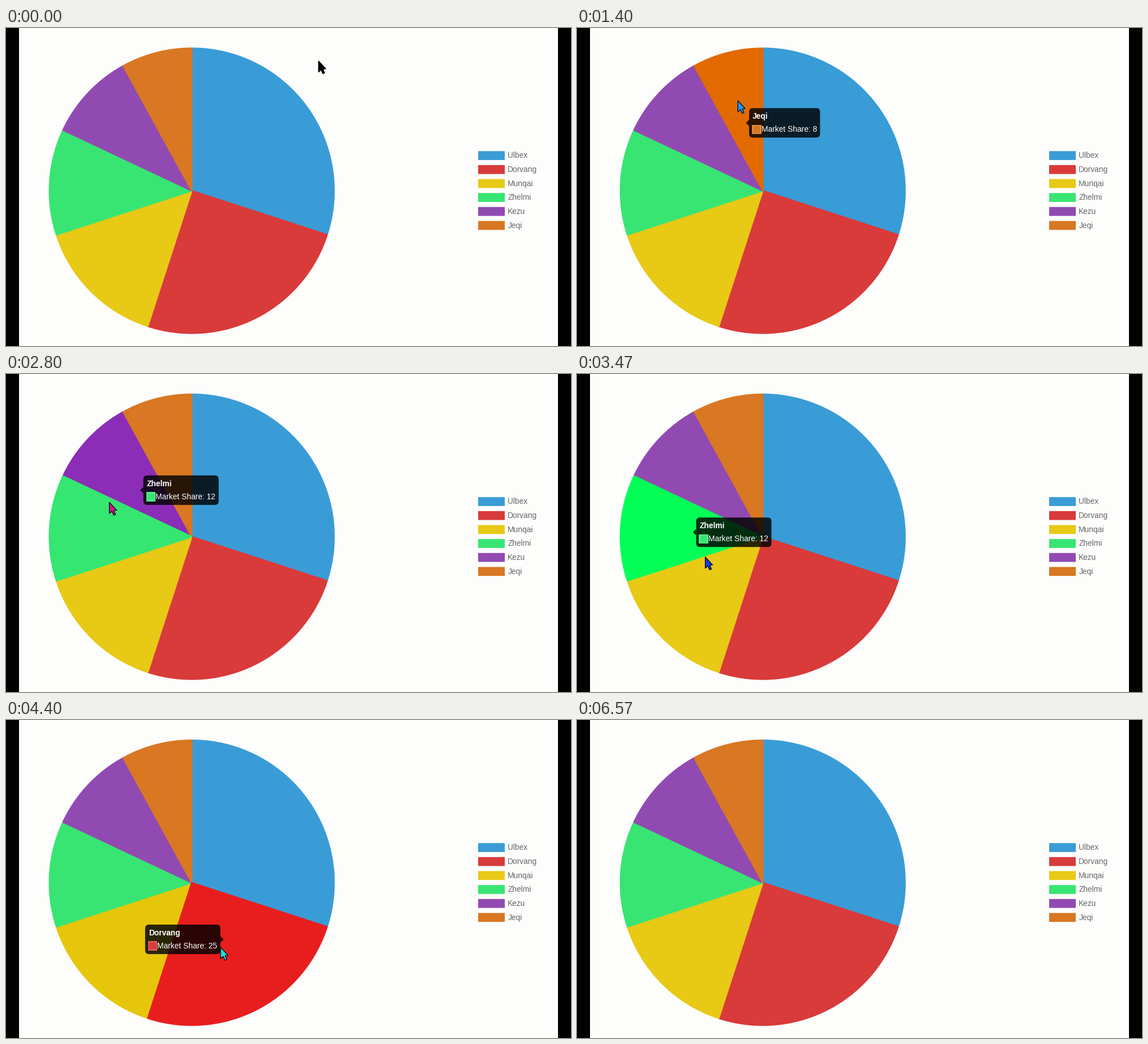
A matplotlib script for the animation above (6.6 s loop, 998 by 561 pixels).

```python
import colorsys
import numpy as np
import matplotlib.pyplot as plt
from matplotlib.animation import FuncAnimation
from matplotlib.colors import to_rgb
from matplotlib.patches import FancyBboxPatch, Polygon, Rectangle

W, H, DPI = 998, 561, 64
PT = 72 / DPI  # points per pixel
STEP, LOOP = 25, 6600
CX, CY, R = 328.1, 287.1, 251.3
FADE, MOVE, LAG = 200, 400, 60  # ms

NAMES = ["Ulbex", "Dorvang", "Munqai", "Zhelmi", "Kezu", "Jeqi"]
SHARE = [30, 25, 15, 12, 10, 8]
BASE = [np.array(to_rgb(c)) for c in
        ("#3a9cd6", "#d93a3a", "#e8c916", "#38e572", "#914ab2", "#d97722")]
EDGES = np.concatenate([[0], np.cumsum(SHARE)]) / 100 * 2 * np.pi

# pointer stops: time, x, y
STOPS = np.array([
    (0, 552, 58), (1120, 328, 112), (1400, 284, 128), (1910, 253, 150),
    (2230, 225, 171), (2740, 182, 219), (3470, 228, 325), (4280, 293, 396),
    (4400, 379, 401), (5130, 445, 325), (5230, 505, 150)], float)
EXIT = STOPS[-1, 0]


def vivid(color):
    """Hover colour: half again the saturation, a tenth darker."""
    h, l, s = colorsys.rgb_to_hls(*color)
    return np.array(colorsys.hls_to_rgb(h, 0.9 * l, min(1, 1.5 * s)))


HOVER = [vivid(c) for c in BASE]


def ease(p):
    return 1 - (1 - np.clip(p, 0, 1)) ** 4


def on_circle(a, r):
    return CX + r * np.sin(a), CY - r * np.cos(a)


def pointer(t):
    """Monotone cubic through the stops."""
    times, pos = STOPS[:, 0], STOPS[:, 1:]
    span = np.diff(times)
    d = np.diff(pos, axis=0) / span[:, None]
    a, b = d[:-1], d[1:]
    slope = np.zeros_like(pos)
    same = a * b > 0
    slope[1:-1][same] = (2 * a * b)[same] / (a + b)[same]
    i = min(np.searchsorted(times, t, side="right") - 1, len(d) - 1)
    h = span[i]
    s = (t - times[i]) / h
    return ((1 + 2 * s) * (1 - s) ** 2 * pos[i]
            + s * (1 - s) ** 2 * h * slope[i]
            + s * s * (3 - 2 * s) * pos[i + 1]
            + s * s * (s - 1) * h * slope[i + 1])


def slice_at(x, y):
    if np.hypot(x - CX, y - CY) > R + 1:
        return None
    a = np.arctan2(x - CX, CY - y) % (2 * np.pi)
    return int(np.searchsorted(EDGES, a, side="right") - 1) % 6


def find_hovers():
    """(time, slice) each time the pointer enters another slice or leaves."""
    hovers, last = [], None
    for t in np.arange(0, EXIT, 5):
        k = slice_at(*pointer(t))
        if k != last:
            hovers.append((t + LAG, k))
            last = k
    return hovers + [(EXIT + LAG, None)]


HOVERS = find_hovers()


def glow_at(t):
    """Hover strength of every slice and the slice now hovered."""
    glow, active = np.zeros(6), None
    ends = [s for s, _ in HOVERS[1:]] + [LOOP]
    for (start, k), end in zip(HOVERS, ends):
        if t < start:
            break
        active = k
        goal = np.arange(6) == k
        glow = glow + (goal - glow) * ease((min(t, end) - start) / MOVE)
    return glow, active


def tip_goal(k):
    """Left edge, middle height and width of the tooltip for slice k."""
    x, y = on_circle((EDGES[k] + EDGES[k + 1]) / 2, R / 2)
    w = 133 if SHARE[k] > 9 else 125
    return np.array([x + 7.8 if x < CX else x - 7.8 - w, y, w])


def tip_at(t):
    """Slice named in the tooltip, its box and its opacity."""
    enters, leave = HOVERS[:-1], HOVERS[-1][0]
    shown = box = None
    ends = [s for s, _ in enters[1:]] + [LOOP]
    for (start, k), end in zip(enters, ends):
        if t < start:
            break
        shown, goal = k, tip_goal(k)
        if box is None:
            box = goal
        box = box + (goal - box) * ease((min(t, end) - start) / MOVE)
    alpha = min((t - enters[0][0]) / FADE, 1 - (t - leave) / FADE)
    return shown, box, np.clip(alpha, 0, 1)


fig = plt.figure(figsize=(W / DPI, H / DPI), dpi=DPI, facecolor="#fdfdfc")
ax = fig.add_axes([0, 0, 1, 1])
ax.set_xlim(0, W)
ax.set_ylim(H, 0)
ax.axis("off")


def add(patch):
    return ax.add_patch(patch)


def label(x, y, text, color, z=1, **kw):
    return ax.text(x, y, text, color=color, family="Liberation Sans",
                   fontsize=13.7 * PT, va="baseline", zorder=z, **kw)


for x in (0, 975):
    add(Rectangle((x, 0), 23, H, fc="black", lw=0))

wedges = []
for k in range(6):
    x, y = on_circle(np.linspace(EDGES[k], EDGES[k + 1], 120), R)
    pts = np.column_stack([np.append(x, CX), np.append(y, CY)])
    wedges.append(add(Polygon(pts, lw=2.6 * PT, joinstyle="bevel")))
    top = 217.2 + 24.65 * k
    add(Rectangle((834, top), 47, 15.7, fc=BASE[k], lw=0, snap=False))
    label(886.3, top + 12.1, NAMES[k], "#666666")

tip = add(FancyBboxPatch((0, 0), 10, 10, fc="black", lw=0, zorder=5,
                         boxstyle="round,pad=0,rounding_size=6.7"))
caret = add(Polygon([(0, 0)] * 3, fc="black", lw=0, zorder=5))
frame = add(Rectangle((0, 0), 16.5, 16.5, lw=0, zorder=6))
swatch = add(Rectangle((0, 0), 11.5, 11.5, lw=0, zorder=6.1))
title = label(0, 0, "", "white", 7, weight="bold")
body = label(0, 0, "", "white", 7)
tip_parts = [tip, caret, frame, swatch, title, body]

ARROW = np.array([(0, 0), (0, 20), (4.5, 16), (7.7, 22.8), (11, 21.4),
                  (8, 14.8), (13, 14)])
arrow = add(Polygon(ARROW, ec="black", lw=1.2 * PT, zorder=9))


def draw_tip(k, box, alpha):
    for part in tip_parts:
        part.set_visible(alpha > 0)
        part.set_alpha(alpha)
    if alpha == 0:
        return
    tip.set_alpha(0.82 * alpha)
    caret.set_alpha(0.82 * alpha)
    left, mid, w = box
    tip.set_bounds(left, mid - 26, w, 52)
    on_left = EDGES[k] >= np.pi
    edge, out = (left, -5.6) if on_left else (left + w, 5.6)
    caret.set_xy([(edge, mid - 5.6), (edge + out, mid), (edge, mid + 5.6)])
    frame.set_xy((left + 5, mid + 3.3))
    swatch.set_xy((left + 7.5, mid + 5.8))
    frame.set_facecolor(BASE[k] * 0.85 + 0.15)
    swatch.set_facecolor(BASE[k])
    title.set_position((left + 6.2, mid - 7))
    title.set_text(NAMES[k])
    body.set_position((left + 21.6, mid + 15.7))
    body.set_text(f"Market Share: {SHARE[k]}")


def draw(i):
    t = i * STEP
    glow, active = glow_at(t)
    colors = [b + (h - b) * g for b, h, g in zip(BASE, HOVER, glow)]
    for k, wedge in enumerate(wedges):
        wedge.set_color(colors[k])
        wedge.set_zorder(2.5 if k == active else 2 + k * 0.01)
    draw_tip(*tip_at(t))

    arrow.set_visible(t < EXIT)
    if t < EXIT:
        x, y = pointer(t)
        arrow.set_xy(ARROW + (x, y))
        k = slice_at(x + 4, y + 9)
        arrow.set_facecolor("black" if k is None else 1 - colors[k])
    return wedges + tip_parts + [arrow]


anim = FuncAnimation(fig, draw, frames=LOOP // STEP, interval=STEP,
                     init_func=lambda: draw(0), repeat=True, repeat_delay=0,
                     blit=False)
plt.show()
```
